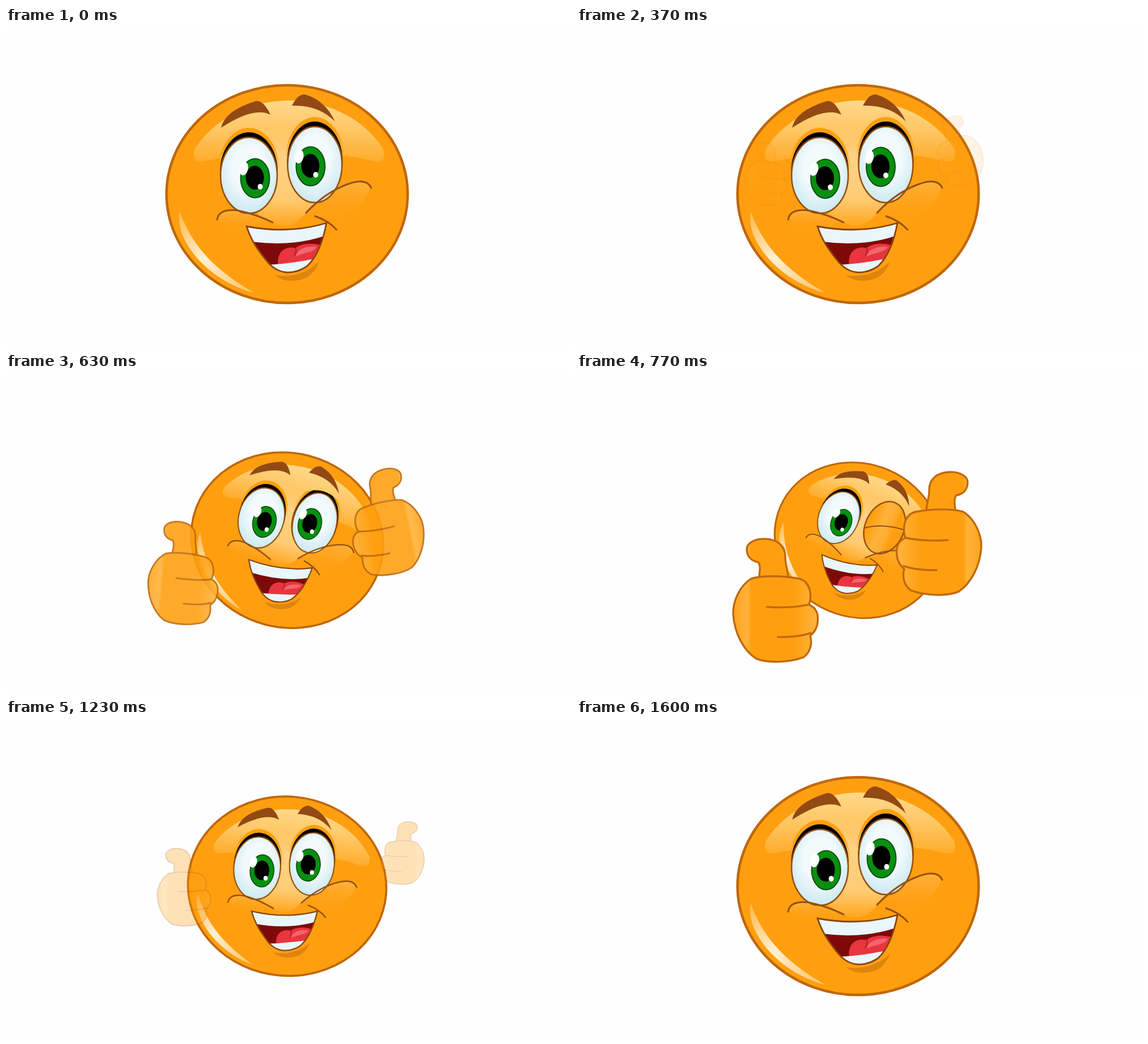
These frames come from a looping animation (998 px wide and 561 px high, 2 s). An HTML page:

```html
<!DOCTYPE html>
<html lang="en">
<head>
<meta charset="utf-8">
<title>Thumbs up</title>
<style>
  html, body { margin: 0; width: 100%; height: 100%; overflow: hidden; background: #fefefe; }
  svg { display: block; width: 100vw; height: 100vh; }
  .crease { fill: none; stroke: #96500f; stroke-width: 3; stroke-linecap: round; }
  .rim { stroke: #c0690c; stroke-width: 3.4; stroke-linejoin: round; stroke-linecap: round; }
</style>
</head>
<body>
<svg viewBox="0 0 998 561">
  <defs>
    <linearGradient id="brow-light" gradientUnits="userSpaceOnUse" x1="0" y1="128" x2="0" y2="242">
      <stop offset="0" stop-color="#ffd98a"/>
      <stop offset=".45" stop-color="#ffc765"/>
      <stop offset="1" stop-color="#ffa924"/>
    </linearGradient>
    <linearGradient id="nose-light" gradientUnits="userSpaceOnUse" x1="0" y1="170" x2="0" y2="352">
      <stop offset="0" stop-color="#ffd285" stop-opacity="0"/>
      <stop offset=".3" stop-color="#ffd285"/>
      <stop offset=".72" stop-color="#ffcc74"/>
      <stop offset="1" stop-color="#ffa318"/>
    </linearGradient>
    <linearGradient id="cheek-light" x1="0" y1="0" x2="0" y2="1">
      <stop offset="0" stop-color="#ffb03a"/>
      <stop offset="1" stop-color="#ff9f10" stop-opacity="0"/>
    </linearGradient>
    <linearGradient id="glint" x1="0" y1="0" x2="1" y2="1">
      <stop offset="0" stop-color="#ffb84c"/>
      <stop offset=".45" stop-color="#fff0d2"/>
      <stop offset="1" stop-color="#ffc266"/>
    </linearGradient>
    <linearGradient id="socket" x1="0" y1="0" x2="0" y2="1">
      <stop offset=".2" stop-color="#ff9f10"/>
      <stop offset=".5" stop-color="#ff9f10" stop-opacity="0"/>
    </linearGradient>
    <radialGradient id="white" cx=".5" cy=".4" r=".62">
      <stop offset=".45" stop-color="#f3fafc"/>
      <stop offset="1" stop-color="#c9e8f1"/>
    </radialGradient>
    <linearGradient id="lid">
      <stop offset=".1" stop-color="#ff9f10"/>
      <stop offset=".4" stop-color="#ffb23a"/>
      <stop offset=".6" stop-color="#ffae32"/>
      <stop offset=".75" stop-color="#ff9f10"/>
    </linearGradient>
    <linearGradient id="skin" gradientUnits="userSpaceOnUse" x1="565" y1="0" x2="715" y2="0">
      <stop offset="0" stop-color="#ffb540"/>
      <stop offset=".28" stop-color="#ff9f10"/>
      <stop offset=".78" stop-color="#ff9f10"/>
      <stop offset=".83" stop-color="#ffb33a"/>
      <stop offset="1" stop-color="#ffa31a"/>
    </linearGradient>
    <clipPath id="mouth-clip">
      <path id="mouth-shape" d="M425 350Q500 364 566 344C560 376 549 404 532 420Q515 432 495 431Q474 429 459 409C442 388 432 372 425 350Z"/>
    </clipPath>
    <clipPath id="gap"><ellipse id="opening" cx="545" cy="240" rx="70" transform="rotate(-20 545 240)"/></clipPath>
    <g id="hand">
      <path class="rim" fill="url(#skin)" d="M617 246C616 230 623 217 622 205C622 184 637 174 657 173C677 172 690 181 690 191C690 205 681 212 670 214C665 220 667 230 669 246Z"/>
      <path class="rim" fill="url(#skin)" d="M598 243C625 238 661 237 682 243C703 256 715 284 714 306C712 340 695 370 674 384C653 393 615 391 590 382C577 373 574 357 578 344C567 335 563 322 565 307C567 297 573 292 580 289C574 272 578 248 598 243Z"/>
      <path class="rim" fill="none" d="M580 289Q615 296 655 293M577 339Q600 347 635 346"/>
    </g>
  </defs>

  <g id="face">
    <ellipse cx="496.500" cy="293" rx="213" ry="192" fill="#ff9f10" stroke="#bf670b" stroke-width="4.500"/>
    <path fill="url(#brow-light)" d="M333 215C362 166 425 128 500 128C575 128 638 166 667 215C671 237 660 237 645 234C600 222 550 222 500 222C450 222 395 226 348 235C334 237 330 228 333 215Z"/>
    <path fill="url(#nose-light)" d="M400 180H585L565 295Q542 308 528 328Q514 347 490 350Q466 344 440 324Z"/>
    <path fill="url(#cheek-light)" d="M534 324Q570 290 605 276Q634 266 643 282Q630 320 575 345Z"/>
    <path fill="url(#cheek-light)" d="M375 336Q381 319 412 323L468 342L425 356Q395 360 375 336Z"/>
    <path fill="url(#glint)" d="M307 324C296 372 356 446 438 467C385 436 332 396 307 324Z"/>
    <g fill="#924913">
      <path d="M380 176Q386 146 441 129Q455 127 467 153Q438 138 380 176Z"/>
      <path d="M505 137Q515 117 527 117Q564 127 581 165Q552 135 505 137Z"/>
    </g>
    <g id="left-eye"></g>
    <g id="shut">
      <ellipse cx="545" cy="238" rx="49" ry="68" fill="url(#lid)" stroke="#96500f" stroke-width="3.500"/>
      <path class="crease" d="M499 258Q537 229 592 224"/>
    </g>
    <g id="right-eye" clip-path="url(#gap)"></g>
    <path class="crease" d="M373 338Q376 318 410 322Q440 328 471 343M530 326Q565 289 605 275Q637 264 645 282"/>
    <g id="mouth">
      <path fill="#df850d" d="M475 436Q520 443 553 412Q541 446 505 446Q486 446 475 436Z"/>
      <g clip-path="url(#mouth-clip)">
        <path fill="#7d0a08" d="M420 340H570V435H420Z"/>
        <path fill="#e8353f" d="M481 420C477 396 492 384 511 388C523 379 543 379 555 383L540 420Z"/>
        <path fill="#f2656b" d="M512 403C514 390 532 384 549 386C544 396 530 395 512 403Z"/>
        <path fill="none" stroke="#b81c26" stroke-width="2" d="M511 388Q515 393 509 402"/>
        <path fill="#e9f6fa" d="M420 340H570L562 367Q505 386 434 377ZM460 418Q500 416 540 408L530 436H470Z"/>
      </g>
      <use href="#mouth-shape" fill="none" stroke="#8a430f" stroke-width="2.800"/>
      <path class="crease" d="M546 332Q570 340 584 356"/>
    </g>
  </g>
  <g id="left-hand"><use href="#hand"/></g>
  <g id="right-hand"><use href="#hand"/></g>
</svg>
<script>
const LOOP = 2000, STEP = 100 / 3;
const $ = id => document.getElementById(id);

// time, scale, turn, mouth turn, gaze x, gaze y
const FACE = [
  [0, 1, 0, 0, 0, 0], [200, 1, 0, 0, 0, 0], [367, 1, 0, 0, -1.5, 1],
  [533, .875, 8.5, -1, -4, 0], [767, .703, 23, -10, 0, 4], [900, .703, 23, -10, 0, 4],
  [1067, .75, 16, -6.5, 0, 2], [1233, .823, 5, -2.5, 0, 0],
  [1433, .935, 1.2, -.6, 0, 0], [1600, 1, 0, 0, 0, 0]
];
// time, x, y, scale, turn
const LEFT = [
  [367, 335, 258, .5, 9], [533, 287, 316, .7, 9], [767, 350, 400, 1, 0],
  [900, 350, 400, 1, 0], [1067, 312.5, 383, .89, 0], [1233, 314, 295.5, .63, 0], [1324, 315, 255, .5, 0]
];
const RIGHT = [
  [367, 672, 217, .55, -20], [533, 694.5, 247, .74, -20], [767, 640, 282, 1, 0],
  [900, 640, 282, 1, 0], [1067, 661, 271.5, .853, 0], [1233, 701, 235, .51, 0], [1324, 718, 218, .36, 0]
];
const WINK = [[600, 0], [733, 1], [900, 1], [1010, 0]];

const clamp = v => Math.max(0, Math.min(1, v));

function sample(keys, t) {
  let i = 0;
  while (i < keys.length - 2 && t >= keys[i + 1][0]) i++;
  const a = keys[i], b = keys[i + 1];
  const p = clamp((t - a[0]) / (b[0] - a[0]));
  return a.slice(1).map((v, n) => v + (b[n + 1] - v) * p);
}

const oval = (x, y, rx, ry, attrs) => `<ellipse cx="${x}" cy="${y}" rx="${rx}" ry="${ry}" ${attrs}/>`;

function eye(x, y, rx, px, py) {
  return oval(x, y - 10, rx + 4, 74, 'fill="url(#socket)"')
    + oval(x, y - 6, rx + 1, 70, 'fill="#000"')
    + oval(x, y, rx, 67, 'fill="url(#white)" stroke="#96500f" stroke-width="2.6"')
    + '<g class="gaze">'
    + oval(px, py, 25.5, 34.5, 'fill="#07900f" stroke="#0a4d12" stroke-width="2"')
    + oval(px - .5, py - 1, 16, 21, 'fill="#000"')
    + oval(px - 20, py - 17, 7.5, 12, `fill="#fff" transform="rotate(12 ${px - 20} ${py - 17})"`)
    + oval(px + 9, py + 15, 4.5, 5, 'fill="#fff"')
    + '</g>';
}
$('left-eye').innerHTML = eye(429, 260, 50, 440, 265);
$('right-eye').innerHTML = eye(545.5, 241, 48, 538, 244);
const gazes = document.querySelectorAll('.gaze');

function placeHand(id, keys, flip, t, alpha) {
  const [x, y, s, turn] = sample(keys, t);
  $(id).setAttribute('transform',
    `translate(${x} ${y}) rotate(${turn}) scale(${s * flip} ${s}) translate(-640 -282)`);
  $(id).setAttribute('opacity', alpha);
}

function draw(t) {
  const [s, turn, mouth, gx, gy] = sample(FACE, t);
  $('face').setAttribute('transform',
    `translate(496.5 294) rotate(${turn}) scale(${s}) translate(-496.5 -294)`);
  $('mouth').setAttribute('transform', `rotate(${mouth} 495 347)`);
  gazes.forEach(g => g.setAttribute('transform', `translate(${gx} ${gy})`));

  const [wink] = sample(WINK, t);
  $('opening').setAttribute('ry', 95 * (1 - wink));
  $('shut').setAttribute('opacity', wink > 0 ? 1 : 0);
  $('right-eye').setAttribute('opacity', wink < 1 ? 1 : 0);

  const alpha = clamp(Math.min((t - 325) / 345, (1324 - t) / 302));
  placeHand('left-hand', LEFT, -1, t, alpha);
  placeHand('right-hand', RIGHT, 1, t, alpha);
}

const start = performance.now();
function tick() {
  const t = (performance.now() - start) % LOOP;
  draw(Math.floor((t + 4) / STEP) * STEP % LOOP);
  requestAnimationFrame(tick);
}
tick();
</script>
</body>
</html>
```
